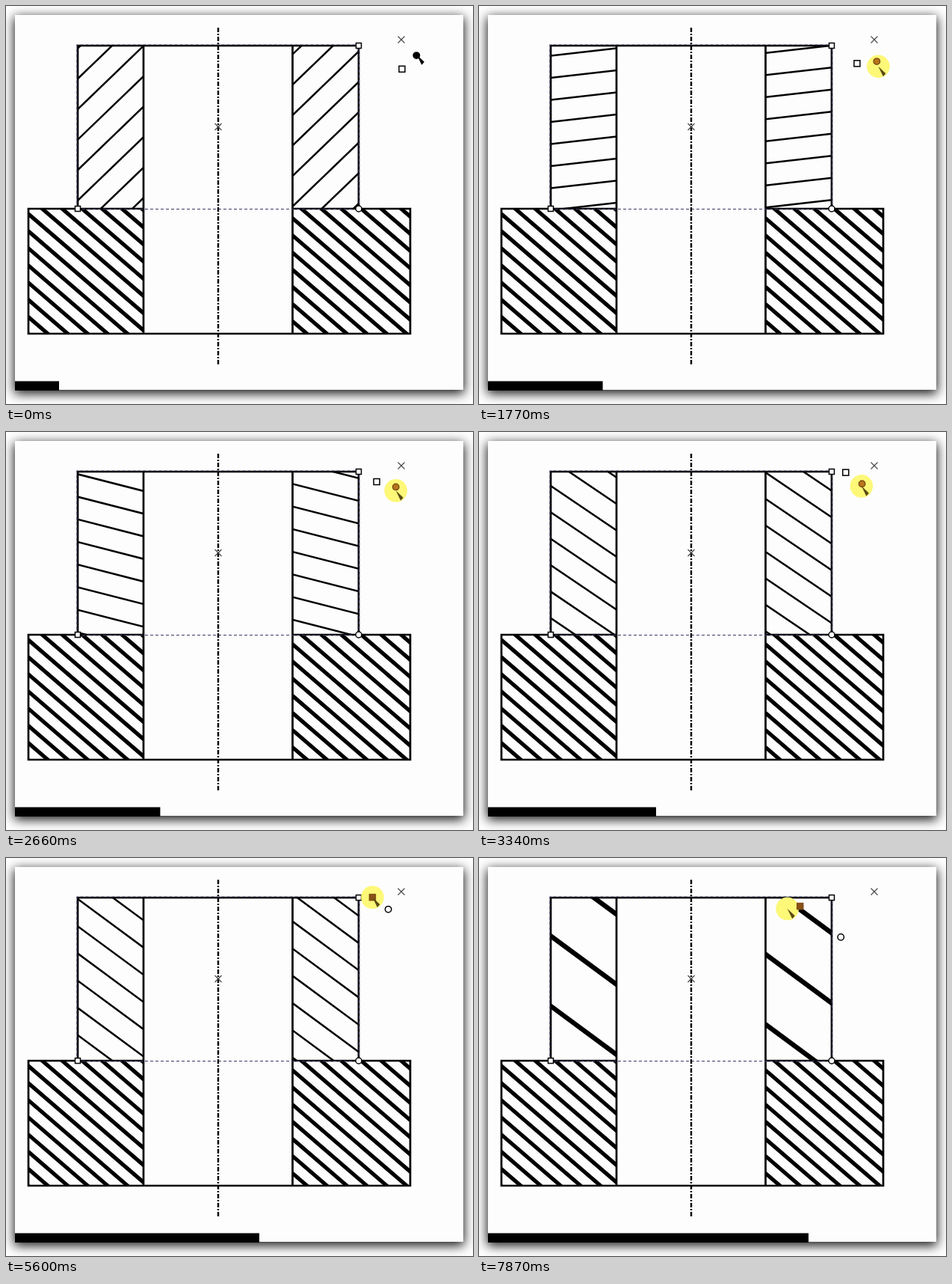
An HTML page for the animation above (8 s loop, 625x532 px).

```html
<!DOCTYPE html>
<html lang="en">
<head>
<meta charset="utf-8">
<title>Hatch pattern editing</title>
<style>
  html, body { margin: 0; width: 100%; height: 100%; overflow: hidden; background: #fff; }
  .card { position: absolute; left: 12px; top: 12px; width: 600px; height: 501px;
          background: #fdfdfd; box-shadow: 0 4px 14px 1px rgba(0, 0, 0, .92); }
  svg { position: absolute; left: 0; top: 0; }
  .ink { fill: none; stroke: #000; stroke-width: 2.7; }
  .axis { stroke: #000; stroke-width: 2.4; stroke-dasharray: 6 2 2 2; }
  .select { fill: none; stroke: #3c3c66; stroke-width: 1.2; stroke-dasharray: 4 3; }
  .cross { fill: none; stroke: #444; stroke-width: 1.1; }
  .handle { fill: #fff; stroke: #000; stroke-width: 1.5; }
</style>
</head>
<body>
<div class="card"></div>
<svg width="625" height="532" viewBox="0 0 625 532">
  <defs>
    <clipPath id="upper"><path d="M96 53H184V270H96ZM384 53H472V270H384Z"/></clipPath>
    <clipPath id="lower"><path d="M30 271H184V438H30ZM384 271H541V438H384Z"/></clipPath>
  </defs>

  <g clip-path="url(#lower)"><path id="denseHatch" class="ink" style="stroke-width:5.2"/></g>
  <g clip-path="url(#upper)"><path id="hatch" class="ink" style="stroke-width:2.5"/></g>

  <path class="ink" d="M184 271H30V438H541V271H384"/>
  <path class="ink" d="M96 271V53H472V271M184 53V438M383.5 53V438"/>
  <path class="select" d="M95 271.5V52H472.5V271.5Z"/>
  <path class="axis" d="M284 29V481"/>
  <path class="cross" d="M279.5 157l9 9m0-9l-9 9M524.5 40.5l9 9m0-9l-9 9"/>

  <rect class="handle" x="92.5" y="267.5" width="7" height="7"/>
  <rect class="handle" x="468.5" y="49.5" width="7" height="7"/>
  <circle class="handle" cx="472" cy="271" r="4"/>

  <circle id="glow" r="15.3" fill="#fdf878"/>
  <circle id="turn" class="handle" r="4.2"/>
  <rect id="size" class="handle" x="-4" y="-4" width="8" height="8"/>
  <path id="pointer" d="M0 0L10 9.5L6.5 13.5Z"/>
  <rect id="bar" x="12" y="501.5" height="12.5"/>
</svg>

<script>
const LOOP = 8000;
const ORIGIN = [529, 45];
const GAP = 29.3;         // hatch spacing and reach of the round handle
const ARM = 39.3;         // reach of the square handle
const ARM_ANGLE = 132.5;  // square handle, relative to the hatch lines
const [hatch, denseHatch, glow, turn, size, pointer, bar] =
  ['hatch', 'denseHatch', 'glow', 'turn', 'size', 'pointer', 'bar']
    .map(id => document.getElementById(id));

const mix = (a, b, u) => a + (b - a) * u;
const progress = (t, from, to) => Math.min(1, Math.max(0, (t - from) / (to - from)));
const smooth = u => u * u * (3 - 2 * u);
const place = (el, [x, y]) => el.setAttribute('transform', `translate(${x} ${y})`);

function frameTime(t) {
  const interval = t < 1080 ? 168 : 226;
  return Math.max(0, 1090 + interval * Math.floor((t - 1068) / interval));
}

// The drag turns the hatch at an uneven pace
const turns = [[500, -43.9], [1090, -33.1], [1770, -6.5], [2660, 14], [3340, 34], [3700, 36.4]];
const angleAt = t => turns.slice(1).reduce(
  (angle, [end, target], i) => angle + (target - turns[i][1]) * progress(t, turns[i][0], end),
  turns[0][1]);

const scaleAt = t => 1 + 1.574 * progress(t, 5600, 7870) ** 1.88;

const barEnd = t => t < 1090 ? mix(71, 135, t / 1090) : mix(135, 441, progress(t, 1090, 7870));

function polar(radius, degrees) {
  const a = degrees * Math.PI / 180;
  return [ORIGIN[0] + radius * Math.cos(a), ORIGIN[1] + radius * Math.sin(a)];
}

// The pointer swings with the round handle, crosses to the square one, then pulls ahead of it
function pointerAt(t, angle, scale) {
  const grip = smooth(progress(t, 400, 1090));
  const cross = smooth(progress(t, 4470, 5150));
  const swing = mix(29, 35.5 - .095 * angle, grip);
  const pull = ARM * scale + 7 * (scale - 1) ** 2;
  return polar(mix(swing, pull, cross), angle + mix(88, ARM_ANGLE, cross));
}

function hatchLines(gap, offset) {
  let d = '';
  for (let k = -30; k <= 30; k++) d += `M-800 ${k * gap + offset}H800`;
  return d;
}

function paintHandle(el, active, pressed, color) {
  el.style.fill = !active ? '#fff' : pressed ? color : '#000';
  el.style.stroke = active && pressed ? '#7d4e16' : '#000';
}

function draw(t) {
  const angle = angleAt(t);
  const scale = scaleAt(t);
  const tip = pointerAt(t, angle, scale);
  const resizing = t > 5100;
  const pressed = resizing || (t > 400 && t < 4400);

  hatch.setAttribute('transform', `translate(${ORIGIN}) rotate(${angle}) scale(${scale})`);
  place(turn, polar(GAP * scale, angle + 90));
  place(size, polar(ARM * scale, angle + ARM_ANGLE));
  paintHandle(turn, !resizing, pressed, '#b8741c');
  paintHandle(size, resizing, pressed, '#8a5216');
  place(glow, tip);
  glow.style.display = pressed ? '' : 'none';
  place(pointer, tip);
  pointer.style.fill = pressed ? '#5a4a14' : '#000';
  bar.setAttribute('width', barEnd(t) - 12);
}

hatch.setAttribute('d', hatchLines(GAP, 1.13));
denseHatch.setAttribute('d', hatchLines(17.4, 0));
denseHatch.setAttribute('transform', 'translate(48.5 271) rotate(40.7)');

const start = performance.now();
function tick() {
  draw(frameTime((performance.now() - start) % LOOP));
  requestAnimationFrame(tick);
}
tick();
</script>
</body>
</html>
```
